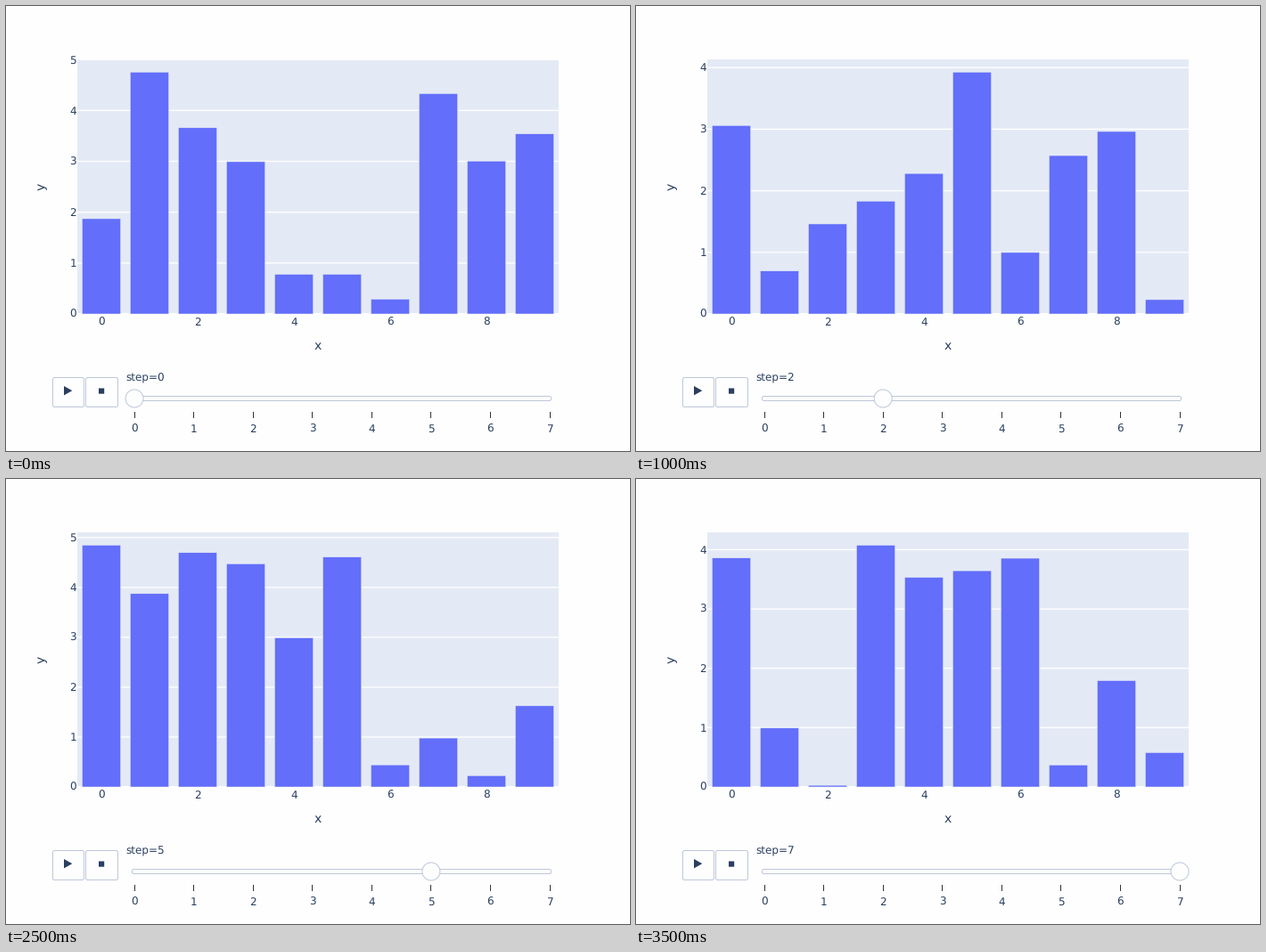
A matplotlib script for the animation above (4000 ms loop, 700x500 px).

```python
import numpy as np
import matplotlib.pyplot as plt
from matplotlib.animation import FuncAnimation
from matplotlib.patches import Circle, FancyBboxPatch, Polygon, Rectangle

W, H, DPI = 700, 500, 100
STEPS, BARS = 8, 10
LEFT, RIGHT, TOP, BASE = 80, 620, 60, 346
SLOT = (RIGHT - LEFT) / BARS

PAPER, PLOT, BAR = "#fefefe", "#e4eaf5", "#636efa"
INK, EDGE = "#2a3f5f", "#bec8d9"

plt.rcParams["font.family"] = "DejaVu Sans"
plt.rcParams["text.hinting"] = "none"

values = np.random.RandomState(42).rand(STEPS, BARS) * 5

fig = plt.figure(figsize=(W / DPI, H / DPI), dpi=DPI, facecolor=PAPER)
ax = fig.add_axes([0, 0, 1, 1])
ax.set_xlim(0, W)
ax.set_ylim(H, 0)
ax.axis("off")


def px(size):
    """Pixels to points."""
    return size * 72 / DPI


def label(x, y, text, size=12, ha="center", **kw):
    return ax.text(x, y, text, fontsize=px(size), color=INK,
                   ha=ha, va="baseline", zorder=6, **kw)


def line(x0, y0, x1, y1, color, width, z):
    return ax.plot([x0, x1], [y0, y1], color=color, lw=px(width), zorder=z,
                   solid_capstyle="butt", snap=False)[0]


def rounded(x0, y0, x1, y1, radius):
    style = f"round,pad=0,rounding_size={radius}"
    ax.add_patch(FancyBboxPatch((x0, y0), x1 - x0, y1 - y0, boxstyle=style,
                                fc=PAPER, ec=EDGE, lw=px(1), zorder=4,
                                snap=False))


def knob_x(step):
    return 144 + step * 466 / (STEPS - 1)


# Plot area
ax.add_patch(Rectangle((LEFT, TOP), RIGHT - LEFT, BASE - TOP,
                       fc=PLOT, lw=0, zorder=0))
line(LEFT, BASE, RIGHT, BASE, "white", 2, 1)
label(79, BASE + 4.2, "0", ha="right")
grid = [line(LEFT, 0, RIGHT, 0, "white", 1.3, 1) for _ in range(5)]
ticks = [label(79, 0, str(n + 1), ha="right") for n in range(5)]

bars = []
for i in range(BARS):
    bar = Rectangle((LEFT + (i + 0.1) * SLOT, BASE), 0.8 * SLOT, 0, fc=BAR,
                    ec="#e5ecf6", lw=px(0.5), zorder=3, snap=False)
    bar.set_clip_path(Rectangle((LEFT, TOP), RIGHT - LEFT, BASE - TOP,
                                transform=ax.transData))
    bars.append(ax.add_patch(bar))
    if i % 2 == 0:
        label(LEFT + (i + 0.5) * SLOT, 359, str(i))

label(350, 386, "x", 14)
label(47, 203, "y", 14, ha="right", rotation=90).set(
    va="center", rotation_mode="default")

# Buttons
rounded(52.5, 417.5, 87.5, 450.5, 2)
rounded(89.5, 417.5, 125.5, 450.5, 2)
ax.add_patch(Polygon([(65, 427), (74.3, 432.2), (65, 437.4)],
                     fc=INK, lw=0, zorder=5))
ax.add_patch(Rectangle((104, 429.5), 6.2, 6.2, fc=INK, lw=0, zorder=5,
                       snap=False))

# Slider
rounded(141.5, 438.5, 611.5, 443.5, 2)
for n in range(STEPS):
    x = knob_x(n)
    mark = np.floor(x) + 0.5
    line(mark, 456, mark, 463, "#333333", 1, 4)
    label(x, 479, str(n))
knob = ax.add_patch(Circle((144, 441), 10, fc=PAPER, ec=EDGE, lw=px(1),
                           zorder=5))
caption = label(134, 422, "", ha="left")


def draw(step):
    heights = values[step]
    peak = heights.max() / 0.95
    unit = (BASE - TOP) / peak
    for bar, v in zip(bars, heights):
        bar.set_y(BASE - v * unit)
        bar.set_height(v * unit)
    for n, (rule, tick) in enumerate(zip(grid, ticks), 1):
        y = BASE - n * unit
        rule.set_ydata([y, y])
        tick.set_y(y + 4.2)
        rule.set_visible(n <= peak)
        tick.set_visible(n <= peak)
    knob.center = (knob_x(step), 441)
    caption.set_text(f"step={step}")
    return []


anim = FuncAnimation(fig, draw, frames=STEPS, init_func=lambda: draw(0),
                     interval=500, repeat=True, repeat_delay=0)
plt.show()
```
